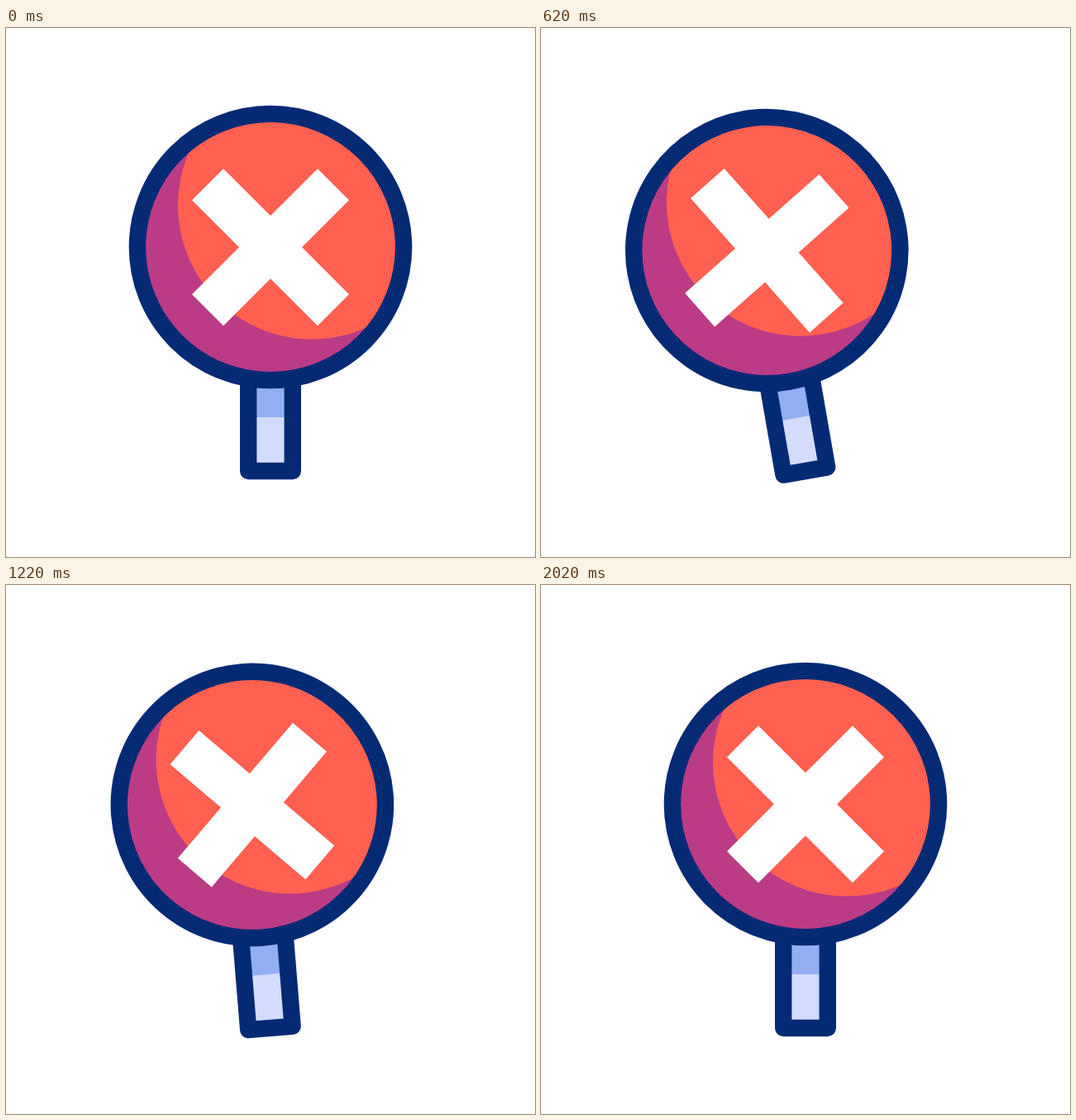
An HTML page that plays this animation: 640x640 px, repeating every 3000 ms.

```html
<!DOCTYPE html>
<html lang="en">
<head>
<meta charset="utf-8">
<title>Swinging cross sign</title>
<style>
html, body { margin: 0; width: 100%; height: 100%; overflow: hidden; background: #fff; }
svg { display: block; width: 100%; height: 100%; }
</style>
</head>
<body>
<svg viewBox="0 0 640 640">
  <clipPath id="disc"><circle cx="320" cy="265" r="161"/></clipPath>
  <g id="sign">
    <path fill="#d3dcfd" d="M293 420h54v116h-54z"/>
    <path fill="#92aff3" d="M293 420h54v51h-54z"/>
    <path fill="none" stroke="#042a74" stroke-width="20.4" stroke-linejoin="round" d="M293.2 425v111h53.6v-111"/>
    <g clip-path="url(#disc)">
      <circle cx="320" cy="265" r="161" fill="#bb3c85"/>
      <circle cx="370" cy="214.5" r="162" fill="#ff6050"/>
    </g>
    <circle cx="320" cy="265" r="161.1" fill="none" stroke="#042a74" stroke-width="20.4"/>
    <path id="cross" stroke="#fff" stroke-width="53.8" d="M-76-76 76 76M76-76-76 76"/>
  </g>
</svg>
<script>
const LOOP = 3000, STEP = 20;

// Turning points as [ms, value], joined by one shared ease
const swing = [[0, 0], [484, -14], [906, 8.3], [1321, -6], [1692, 2.6], [1860, -1.2], [2020, 0]];
const turn = [[255, 0], [973, 200], [1176, 180]];
const size = [[0, 1], [233, 0.8], [845, 1.08], [1176, 1]];

const ease = u => u * u / (u * u + (1 - u) ** 2);

function valueAt(keys, t) {
  let [from, value] = keys[0];
  for (const [to, next] of keys.slice(1)) {
    const u = Math.min(1, Math.max(0, (t - from) / (to - from)));
    value += (next - value) * ease(u);
    if (t < to) break;
    from = to;
  }
  return value;
}

const sign = document.getElementById('sign');
const cross = document.getElementById('cross');
const start = performance.now();

function draw() {
  const elapsed = Math.max(0, performance.now() - start) % LOOP;
  const t = Math.floor(elapsed / STEP) * STEP;
  sign.setAttribute('transform', `rotate(${valueAt(swing, t)} 320 537)`);
  cross.setAttribute('transform',
    `translate(320 265.2) rotate(${valueAt(turn, t)}) scale(${valueAt(size, t)})`);
  requestAnimationFrame(draw);
}
draw();
</script>
</body>
</html>
```
